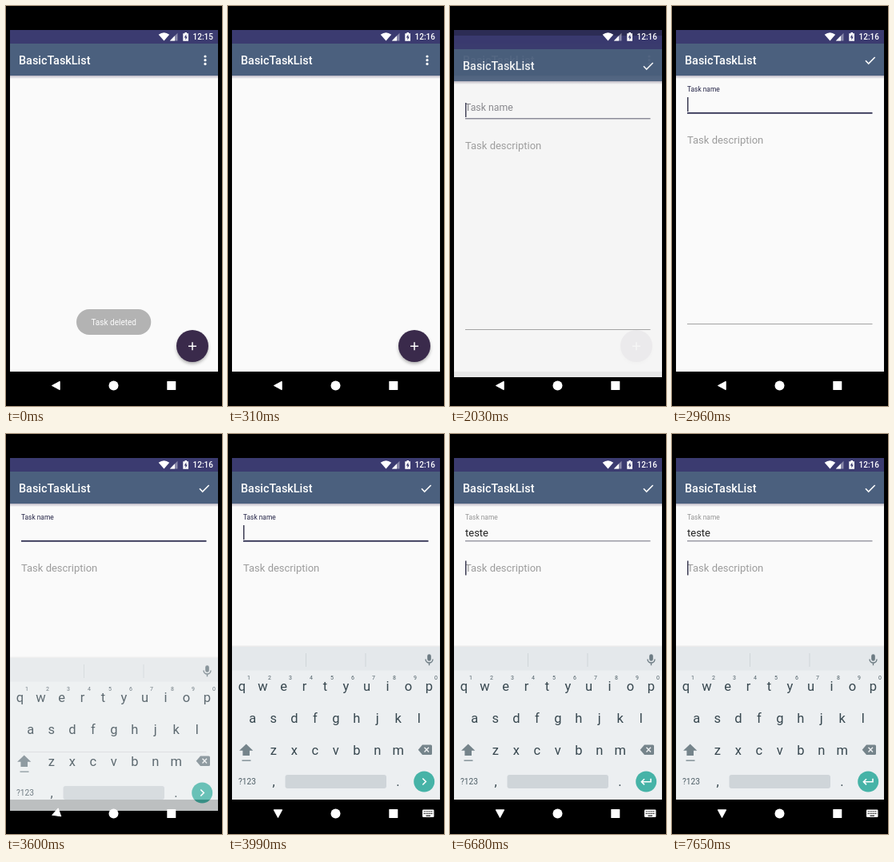
Animation, 270 px wide and 500 px high, one loop 8 s. Source, as an HTML page:

```html
<!DOCTYPE html>
<html lang="en">
<head>
<meta charset="utf-8">
<title>Task list</title>
<style>
  html, body { margin: 0; width: 100%; height: 100%; overflow: hidden; background: #000; }
  svg { display: block; width: 100vw; height: 100vh; font-family: Roboto, "Noto Sans", sans-serif; }
  .title { font-size: 14.4px; font-weight: 500; fill: #fff; }
  .mid { text-anchor: middle; }
  .body { font-size: 13px; }
  .key { font-size: 16.5px; fill: #37474f; }
  .digit { font-size: 7px; fill: #4f5f67; }
</style>
</head>
<body>
<svg viewBox="0 0 270 500">
  <defs>
    <linearGradient id="shade" x2="0" y2="1">
      <stop offset="0" stop-color="#2c2048" stop-opacity=".3"/>
      <stop offset="1" stop-color="#2c2048" stop-opacity="0"/>
    </linearGradient>
    <filter id="blur" x="-30%" y="-30%" width="160%" height="160%"><feGaussianBlur stdDeviation="2"/></filter>
    <g id="page">
      <rect x="5" y="30" width="260" height="427" fill="#fafafa"/>
      <rect x="5" y="30" width="260" height="17" fill="#3b3b70"/>
      <rect x="5" y="47" width="260" height="40" fill="#4b607e"/>
      <rect x="5" y="87" width="260" height="4" fill="url(#shade)"/>
      <text class="title" x="16" y="73">BasicTaskList</text>
    </g>
  </defs>
  <rect width="270" height="500"/>

  <g id="home">
    <use href="#page"/>
    <g fill="#fff">
      <circle cx="249" cy="63" r="1.6"/><circle cx="249" cy="67.7" r="1.6"/><circle cx="249" cy="72.4" r="1.6"/>
    </g>
    <circle cx="233" cy="427.5" r="19.5" opacity=".35" filter="url(#blur)"/>
    <circle id="fab" cx="233" cy="425" r="20" fill="#3a2a4b"/>
    <path d="M228 425.2h10M233 420.2v10" stroke="#fff" stroke-width="1.5"/>
  </g>

  <g id="toast">
    <rect x="88" y="379" width="93.3" height="32" rx="16" fill="#3c3c3c"/>
    <text class="mid" x="134.7" y="398.8" font-size="10" fill="#fff">Task deleted</text>
  </g>

  <g id="edit">
    <use href="#page"/>
    <path d="M242 68.3l3.7 3.7 8-8" fill="none" stroke="#fff" stroke-width="1.6"/>
    <text id="label" x="19">Task name</text>
    <rect id="line" x="19" width="231.5"/>
    <text id="name" class="body" x="19" y="128" fill="#222"></text>
    <rect id="composing" x="19" y="129.6" height="1" fill="#333"/>
    <text id="hint" class="body" x="19" y="172.3">Task description</text>
    <rect x="19" y="397" width="231.5" height="1" fill="#a3a3a3"/>
    <rect id="caret" width="1.5" height="18" fill="#3b3b52"/>
  </g>

  <g id="board">
    <rect x="5" y="264.5" width="260" height="2" fill="#000" opacity=".06"/>
    <rect x="5" y="266" width="260" height="191" fill="#eceff1"/>
    <rect x="5" y="266" width="260" height="29.5" fill="#e4e8eb"/>
    <path d="M97.5 274v17M172 274v17" stroke="#cfd5d9"/>
    <g id="words" class="body mid">
      <text x="63.5" y="287" fill="#6f7d84"></text>
      <text x="134.5" y="287" fill="#37474f"></text>
      <text x="205.7" y="287" fill="#6f7d84"></text>
      <g fill="#37474f"><circle cx="130.3" cy="294" r="1.2"/><circle cx="134.3" cy="294" r="1.2"/><circle cx="138.3" cy="294" r="1.2"/></g>
    </g>
    <g fill="none" stroke="#6d7c84" stroke-width="1.4">
      <rect x="249.9" y="276" width="3.2" height="7" rx="1.6" fill="#6d7c84"/>
      <path d="M247 281.5a4.5 4.5 0 0 0 9 0M251.5 286v3.2"/>
    </g>
    <g id="keys"></g>
    <g fill="#75848b">
      <path d="M22.7 387.5l8.6 8.3h-4.3v6.2h-8.6v-6.2h-4.3z"/>
      <rect x="17.5" y="407.5" width="11" height="1.3"/>
      <path d="M243 388.5h10.500q1.500 0 1.500 1.500v9.500q0 1.500-1.500 1.500h-10.500l-5.300-6.250z"/>
    </g>
    <path d="M245.5 391.800l5.500 5.600m0-5.600l-5.500 5.600" stroke="#eceff1" stroke-width="1.4"/>
    <text class="mid" x="24" y="438" font-size="10.200" fill="#4f5f67">?123</text>
    <rect x="71.500" y="426" width="126.500" height="17" rx="3" fill="#cfd5d9"/>
    <circle cx="245.200" cy="434.500" r="13" fill="#46b3a7"/>
    <g fill="none" stroke="#fff" stroke-width="1.600">
      <path id="next" d="M243.300 430.500l4 4-4 4"/>
      <path id="enter" d="M251 430.800v4h-11.500M243 431.200l-3.600 3.600 3.600 3.600"/>
    </g>
  </g>

  <g fill="#fff">
    <path d="M190.700 35.800Q197.500 30.600 204.200 35.800L197.500 43.500z"/>
    <path d="M214.500 33.800v9.700h-9.700z" opacity=".4"/>
    <path d="M211 37.300v6.200h-6.200z"/>
    <path d="M223.500 33h2.500v1.200h2v9.500h-6.700v-9.500h2.200z"/>
    <path d="M225.300 35.500l-2.600 4h1.700v3l2.500-4h-1.600z" fill="#3b3b70"/>
    <text id="clock" x="233.600" y="42.200" font-size="10" font-weight="500"></text>
    <path id="back" d="M57.500 474.500l9.700-5.200v10.400z" stroke="#fff" stroke-linejoin="round"/>
    <circle cx="134.500" cy="474.500" r="6"/>
    <rect x="201.300" y="469" width="11" height="11" rx=".6"/>
    <g id="switch">
      <rect x="243" y="469.500" width="14.500" height="9.500" rx="1.200"/>
      <path d="M244.700 472h11.500M244.700 474.500h11.500" stroke="#000" stroke-width="1.200" stroke-dasharray="1.400 .8"/>
      <path d="M247.500 477.200h5.500" stroke="#000" stroke-width="1.100"/>
    </g>
  </g>
</svg>
<script>
const LOOP = 8000;
const $ = id => document.getElementById(id);
const set = (el, attrs) => { for (const k in attrs) el.setAttribute(k, attrs[k]); };
const show = (el, on) => el.setAttribute('visibility', on ? 'inherit' : 'hidden');
const write = (el, s) => { if (el.textContent !== s) el.textContent = s; };
const mix = (a, b, p) => a + (b - a) * p;
const blend = (a, b, p) => `rgb(${a.map((v, i) => Math.round(mix(v, b[i], p)))})`;

// Each row is [start time, ...values], held until the next row.
const held = (rows, t) => rows.reduce((now, row) => row[0] <= t ? row : now).slice(1);

const toast = [[0, .37], [30, .25], [80, .12], [130, 0]];
// offset, opacity, label float
const opening = [[0, 0, 0, 0], [1980, 29, .35, 0], [2030, 7, .93, .15],
  [2110, 2, 1, .55], [2160, .5, 1, .88], [2210, 0, 1, 1]];
// offset, opacity, back button turn
const rising = [[0, 0, 0, 0], [3520, 35, .3, 0], [3570, 14, .8, -20], [3630, 5, .95, -45],
  [3680, 2, 1, -65], [3730, .5, 1, -80], [3790, 0, 1, -87], [3840, 0, 1, -90]];
const typed = [[0, ''], [4590, 't'], [4640, 'te'], [4900, 'tes'], [5070, 'test'], [5240, 'teste']];
const words = [[0, '', '', ''], [4820, 'the', 'te', 'term'], [4980, 'yes', 'tes', 'test'],
  [5150, 'tests', 'test', 'tested'], [5330, 'tests', 'teste', 'tested'], [5660, '', '', '']];
const caretOn = [[0, 1], [2450, 0], [2960, 1], [3470, 0], [3990, 1], [4450, 0], [4590, 1],
  [6120, 0], [6680, 1], [7140, 0], [7650, 1]];
// how far the name field has lost focus
const blur = [[0, 0], [5660, .5], [5710, 1]];

function addKey(cls, x, y, s) {
  const el = document.createElementNS('http://www.w3.org/2000/svg', 'text');
  set(el, { class: cls + ' mid', x, y });
  el.textContent = s;
  $('keys').append(el);
}
[['qwertyuiop', 17.5, 321.3], ['asdfghjkl', 30.8, 361], ['zxcvbnm', 56.8, 401]].forEach(([row, x, y]) =>
  [...row].forEach((c, i) => addKey('key', x + 26 * i, y, c)));
[...'1234567890'].forEach((c, i) => addKey('digit', 26 + 26 * i, 307.3, c));
addKey('key', 57, 440, ',');
addKey('key', 212.5, 440, '.');

const slots = $('words').querySelectorAll('text');
const dots = $('words').querySelector('g');
const grey = [150, 150, 150], navy = [38, 38, 72];

function render(t) {
  write($('clock'), t < 310 ? '12:15' : '12:16');
  set($('toast'), { opacity: held(toast, t)[0] });
  set($('fab'), { fill: t < 1750 ? '#3a2a4b' : '#3f2c4d' });

  const [dy, alpha, float] = held(opening, t);
  set($('edit'), { transform: `translate(0 ${dy})`, opacity: alpha });
  show($('edit'), alpha > 0);
  set($('home'), { opacity: t < 1980 ? 1 : .75 });
  show($('home'), alpha < 1);

  const [lost] = held(blur, t);
  const focus = float * (1 - lost);
  set($('label'), {
    y: mix(127.6, 106.9, float), 'font-size': mix(13, 8.4, float), fill: blend(grey, navy, focus)
  });
  const thick = mix(1, 1.8, focus);
  set($('line'), { y: 133.8 - thick / 2, height: thick, fill: blend([110, 110, 125], [48, 48, 82], focus) });

  const [text] = held(typed, t);
  write($('name'), text);
  const width = text ? $('name').getComputedTextLength() : 0;
  const inName = t < 5660;
  set($('composing'), { width });
  show($('composing'), inName && text);
  set($('hint'), { fill: t >= 5530 && t < 5660 ? '#757575' : '#9c9c9c' });
  set($('caret'), { x: inName && text ? 19.3 + width : 19, y: inName ? 114 : 158.5 });
  show($('caret'), held(caretOn, t)[0]);

  const [ky, kAlpha, turn] = held(rising, t);
  set($('board'), { transform: `translate(0 ${ky})`, opacity: kAlpha });
  show($('board'), kAlpha > 0);
  set($('back'), { transform: `rotate(${turn} 62.5 474.5)` });
  show($('switch'), t >= 3680);
  const tips = held(words, t);
  slots.forEach((el, i) => write(el, tips[i]));
  show(dots, tips[1]);
  show($('next'), inName);
  show($('enter'), !inName);
}

const start = performance.now();
function tick() {
  render((performance.now() - start) % LOOP);
  requestAnimationFrame(tick);
}
tick();
</script>
</body>
</html>
```
